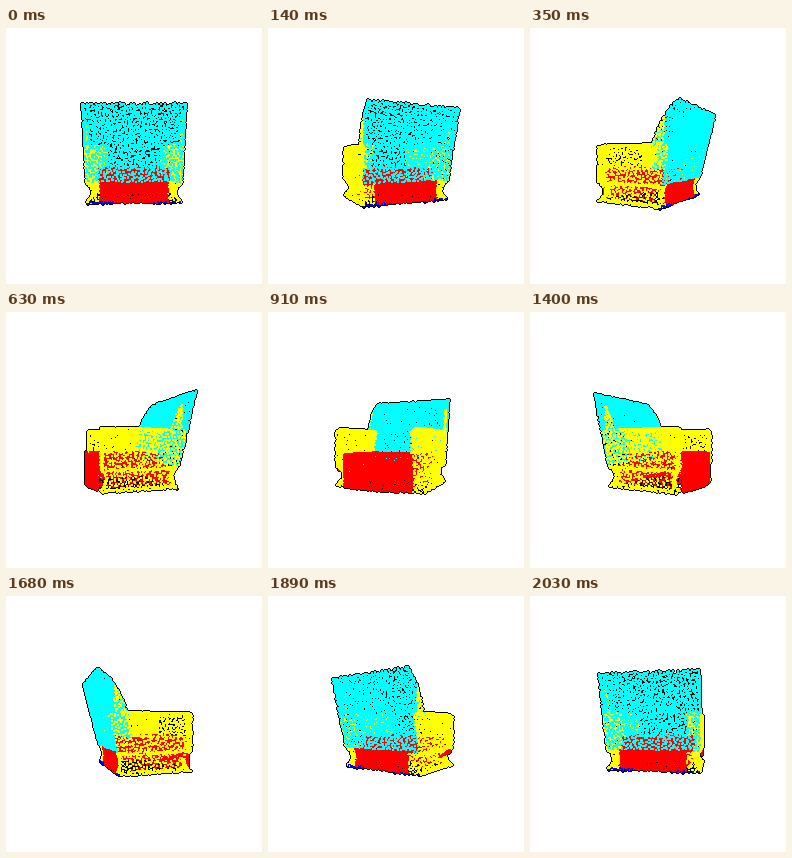
A matplotlib script that plays this animation: 256 px wide and 256 px high, repeating every 2.1 s.

```python
import numpy as np
import matplotlib.pyplot as plt
from matplotlib.animation import FuncAnimation

SIZE, FRAMES, STEP = 256, 30, 70
CENTER, CAMERA = 127.5, 257
CYAN, YELLOW, RED, BLUE = (0, 255, 255), (255, 255, 0), (255, 0, 0), (0, 0, 255)

# Chair measures: x to the side, y up, z to the rear
WIDE, INNER = 43, 31
TOP, ARM, SEAT, WAIST, FLOOR = 43.5, 7, -12.5, -24, -42
FRONT = -40

rng = np.random.default_rng(4)
points, colors = [], []


def mix(a, b, t):
    return a + (b - a) * t


def rear(y):
    """Leaning rear plane of the back rest."""
    return 33.5 + 0.26 * y


def cushion(y):
    """Front of the back rest, swelling as a quarter ellipse."""
    t = np.clip((y - SEAT) / (TOP - SEAT), 0, 1)
    return rear(y) - 18.5 * np.sqrt(1 - t * t)


def hollow(y):
    """Concave moulding around the plinth."""
    return 4.5 * np.sin(np.pi * np.clip((WAIST - y) / (WAIST - FLOOR), 0, 1))


def sheet(color, pitch, shape):
    """Scatter points over the surface shape(u, v) with u and v in 0..1."""
    def length(u, v):
        line = np.array(np.broadcast_arrays(*shape(u, v)))
        return np.linalg.norm(np.diff(line), axis=0).sum()

    t, half = np.linspace(0, 1, 40), np.full(40, 0.5)
    nu = max(1, round(length(t, half) / pitch))
    nv = max(1, round(length(half, t) / pitch))
    u, v = (g.ravel() for g in np.meshgrid(np.arange(nu), np.arange(nv)))
    u = (u + rng.random(u.size)) / nu
    v = (v + rng.random(v.size)) / nv
    p = np.stack(np.broadcast_arrays(*shape(u, v)), axis=1)
    points.append(p)
    colors.append(np.tile(np.array(color, np.uint8), (len(p), 1)))


def across(color, pitch, half, low, high, depth):
    """Upright sheet spanning the width, depth given by height."""
    def shape(u, v):
        y = mix(low, high, v)
        return half * (2 * u - 1), y, depth(y)
    sheet(color, pitch, shape)


def flank(side, color, pitch, low, high, start, end, x=WIDE):
    """Side sheet between two depth profiles."""
    def shape(u, v):
        y = mix(low, high, v)
        return side * (x - hollow(y)), y, mix(start(y), end(y), u)
    sheet(color, pitch, shape)


def fore(y):
    return FRONT + hollow(y)


def base(y):
    return 26 - hollow(y) / 2


def arm(side):
    def roll(u, v):
        y = ARM - 1 + 4 * np.sqrt(np.sin(np.pi * u))
        return side * mix(INNER - 1, WIDE, u), y, mix(FRONT, 22, v)

    def face(u, v):
        y = mix(FLOOR, ARM + 2, v)
        return side * (mix(INNER + 1, WIDE, u) - hollow(y) * u), y, fore(y)

    def heel(u, v):
        y = mix(FLOOR, WAIST, v)
        return side * (mix(INNER, WIDE, u) - hollow(y) * u), y, base(y)

    sheet(YELLOW, 2.1, roll)
    sheet(YELLOW, 1.8, face)
    sheet(YELLOW, 1.8, heel)
    flank(side, YELLOW, 2.3, WAIST, ARM + 2, fore, rear)
    flank(side, YELLOW, 2.4, SEAT, ARM, fore, cushion, INNER)
    flank(side, YELLOW, 2.7, FLOOR, WAIST, fore, base)
    for y in (WAIST - 2, FLOOR):
        flank(side, YELLOW, 1.4, y, y + 2.5, fore, base)


def wing(side):
    def ridge(y):
        return np.maximum(cushion(y), 31)
    flank(side, CYAN, 2.1, ARM + 2, TOP, ridge, rear)
    flank(side, YELLOW, 2.0, ARM + 2, 31, cushion, ridge)


def seat_top(u, v):
    return INNER * (2 * u - 1), SEAT - v, mix(FRONT, 12, v)


def seat_front(u, v):
    return 33 * (2 * u - 1), mix(SEAT, FLOOR, v), FRONT - 2 - 20 * u * (1 - u)


def flap(u, v):
    """Loose piece of seat on one side of the plinth."""
    return WIDE - 0.5, mix(-31, WAIST, u) - 5 * u * v, mix(-10, -36, u)


across(CYAN, 2.15, WIDE, -23, TOP, rear)
across(CYAN, 2.15, WIDE, ARM, TOP, cushion)
across(CYAN, 2.3, INNER, SEAT, ARM, cushion)
for side in (-1, 1):
    wing(side)
    arm(side)
    flank(side, RED, 2.2, FLOOR + 2, SEAT, lambda y: FRONT, lambda y: 14, 33)
sheet(RED, 1.6, seat_top)
sheet(RED, 1.2, seat_front)
sheet(RED, 1.3, flap)
across(RED, 1.25, INNER, FLOOR, WAIST, base)

# Feet along the rear edge, sparser on one side
for side, pitch in ((-1, 1.5), (1, 2.6)):
    sheet(BLUE, pitch, lambda u, v: (side * mix(18, 42, u), FLOOR + 1 - 2 * v, 26))

points, colors = np.concatenate(points), np.concatenate(colors)
BLOCK = np.array([(i, j) for i in (0, 1) for j in (0, 1)])
RIM = np.array([(i, j) for i in range(-1, 3) for j in range(-1, 3)
                if i in (0, 1) or j in (0, 1)])


def stamp(img, px, py, shape, color):
    cols = (px[:, None] + shape[:, 0]).ravel()
    rows = (py[:, None] + shape[:, 1]).ravel()
    img[rows, cols] = color


def render(frame):
    angle = 2 * np.pi * frame / FRAMES
    x, y, z = points.T
    depth = z * np.cos(angle) - x * np.sin(angle)
    scale = 1 / (1 - depth / CAMERA)
    px = np.floor(CENTER + scale * (x * np.cos(angle) + z * np.sin(angle))).astype(int)
    py = np.floor(CENTER - scale * y).astype(int)
    order = np.argsort(depth)
    img = np.full((SIZE, SIZE, 3), 255, np.uint8)
    stamp(img, px, py, RIM, 0)
    stamp(img, px[order], py[order], BLOCK, np.repeat(colors[order], len(BLOCK), axis=0))
    return img


fig = plt.figure(figsize=(SIZE / 100, SIZE / 100), dpi=100, facecolor="white")
ax = fig.add_axes([0, 0, 1, 1])
ax.axis("off")
view = ax.imshow(render(0), interpolation="nearest", aspect="auto")


def update(frame):
    view.set_data(render(frame))
    return [view]


anim = FuncAnimation(fig, update, frames=FRAMES, interval=STEP, repeat=True,
                     repeat_delay=0, blit=False)
plt.show()
```
